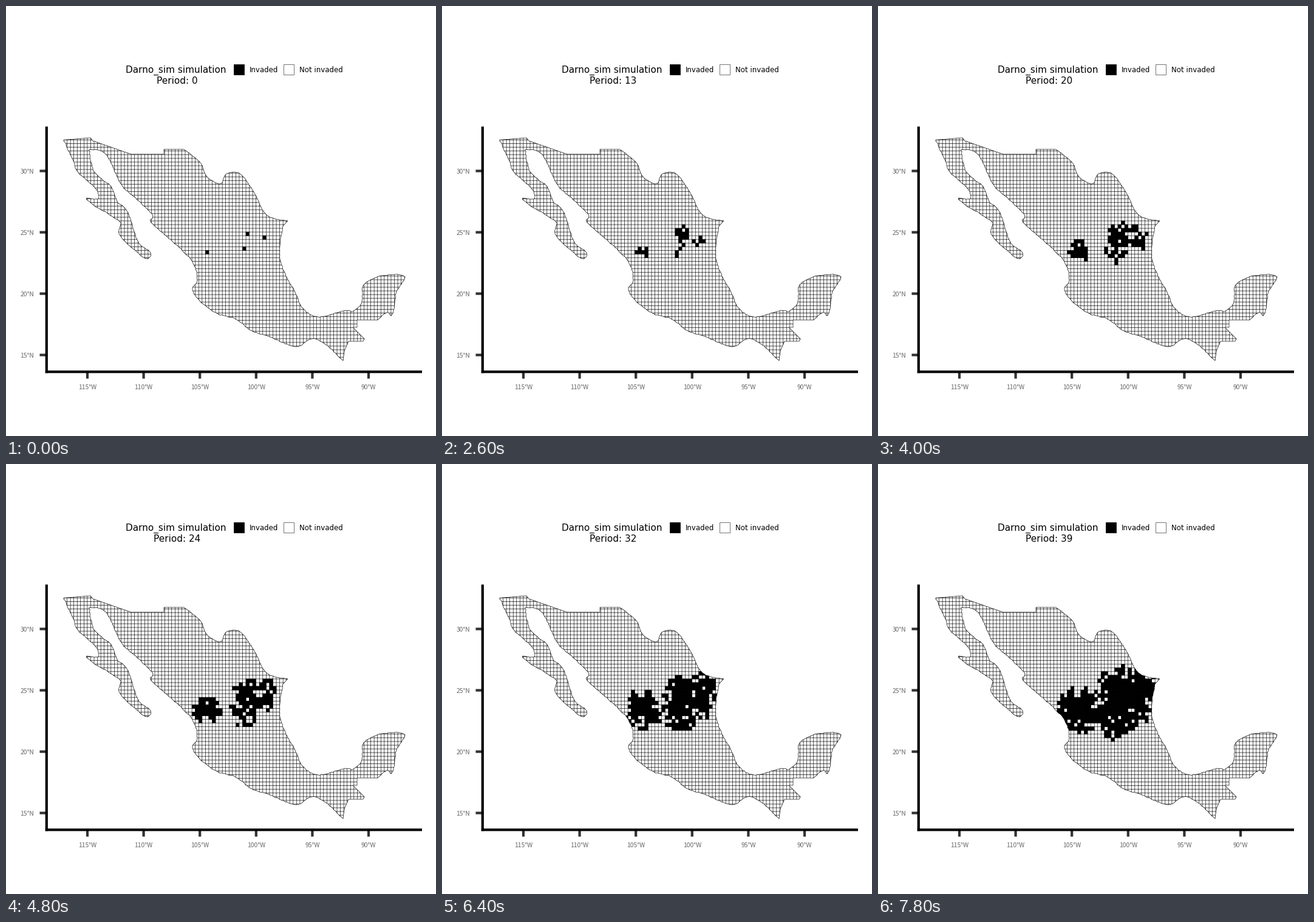
A matplotlib script that plays this animation: 708x708 px, repeating every 8000 ms.

```python
import numpy as np
import matplotlib.pyplot as plt
from matplotlib.animation import FuncAnimation
from matplotlib.collections import LineCollection, PolyCollection
from matplotlib.patches import Polygon, Rectangle

SIZE, DPI = 708, 100
PX = 72 / DPI                      # points per pixel
FRAMES, STEP = 40, 200
X0, Y0 = 95.0, 584.2               # south-west corner of the cell grid
CW, CH = 5.556, 6.06               # cell size
COLS, ROWS = 102, 61
HAIR = 0.65 * PX

# Key points of the outline in pixels, clockwise from the north-west corner
NORTH = [(95, 220.5), (139, 217), (143, 222), (206, 244), (260, 244),
         (260, 236), (293, 236)]
RIVER = [(293, 236), (320, 258), (330, 280), (353, 293), (362, 277),
         (385, 276), (408, 306), (429, 344), (464, 354)]
GULF = [(464, 354), (455, 368), (452, 420), (477, 474), (489, 498),
        (514, 512), (558, 501), (571, 503), (586, 487), (589, 459),
        (619, 444), (656, 445), (643, 470), (640, 490), (635, 510),
        (628, 504), (612, 517)]
SOUTH = [(612, 517), (578, 517), (578, 529), (571, 529), (590, 548),
         (588, 552), (564, 552), (557, 568), (555, 584)]
PACIFIC = [(555, 584), (527, 558), (503, 548), (477, 561), (433, 544),
           (405, 535), (377, 515), (349, 507), (320, 487), (307, 466),
           (315, 450), (305, 418), (264, 379), (238, 355), (242, 345),
           (215, 318), (190, 294), (171, 254), (158, 239), (137, 236)]
PENINSULA = [(137, 236), (145, 273), (173, 297), (183, 322), (200, 339),
             (217, 387), (238, 406), (228, 415), (187, 377), (187, 355),
             (143, 327), (133, 316), (151, 318), (149, 302), (118, 273),
             (110, 253), (95, 220.5)]

# First invaded cells: column, row, periods per column and per row of spread
SEEDS = [(42, 29, 5.4, 5.5), (54, 34, 5.0, 5.4),
         (53, 30, 5.4, 4.0), (59, 33, 5.8, 4.4)]
DELAY = 7.5                        # mean extra wait of a cell, in periods


def coast(points, rng, amp=0.7, gap=3.0):
    """Smooth curve through the points with a little ragged noise."""
    p = np.array([points[0], *points, points[-1]], float)
    out = []
    for a, b, c, d in zip(p, p[1:], p[2:], p[3:]):
        n = max(2, int(np.hypot(*(c - b)) / gap))
        t = np.arange(n)[:, None] / n
        curve = b + 0.5 * t * (c - a + t * (2 * a - 5 * b + 4 * c - d
                                            + t * (3 * (b - c) + d - a)))
        curve[1:] += rng.uniform(-amp, amp, (n - 1, 2))
        out += list(curve)
    return out


def invasion_periods(rng):
    """Period at which each cell is invaded, indexed [row, column]."""
    row, col = np.mgrid[:ROWS, :COLS]
    reach = np.min([np.hypot(sx * (col - c), sy * (row - r))
                    for c, r, sx, sy in SEEDS], axis=0)
    return np.where(reach > 0, reach + rng.exponential(DELAY, reach.shape), 0)


def cell(c, r):
    x, y = X0 + c * CW, Y0 - r * CH
    return [(x, y), (x + CW, y), (x + CW, y - CH), (x, y - CH)]


rng = np.random.default_rng(12)
outline = (NORTH[:-1] + coast(RIVER, rng, 0.4) + coast(GULF, rng)
           + SOUTH[:-1] + coast(PACIFIC, rng) + coast(PENINSULA, rng))
born = invasion_periods(rng)

fig = plt.figure(figsize=(SIZE / DPI, SIZE / DPI), dpi=DPI, facecolor="white")
ax = fig.add_axes([0, 0, 1, 1])
ax.set(xlim=(0, SIZE), ylim=(SIZE, 0))
ax.axis("off")


def line(x, y, color):
    ax.plot(x, y, color=color, lw=4.2 * PX, solid_capstyle="butt", snap=False)


def key(x, fill, edge):
    ax.add_patch(Rectangle((x, 96), 17, 17, fc=fill, ec=edge, lw=0.8 * PX))


def label(x, y, s, size, ha="left", color="black", font="DejaVu Sans"):
    return ax.text(x, y, s, fontsize=size * PX, ha=ha, va="baseline",
                   color=color, fontfamily=font)


def tick_label(x, y, s, ha):
    label(x, y, s, 10.3, ha, "#666666", "Noto Sans CJK JP")


# Map with its cell grid
land = Polygon(outline, closed=True, fc="white", ec="black", lw=HAIR)
ax.add_patch(land)
lines = [[(X0 + i * CW, 200), (X0 + i * CW, 600)] for i in range(COLS)]
lines += [[(90, Y0 - j * CH), (665, Y0 - j * CH)] for j in range(ROWS)]
grid = LineCollection(lines, colors="black", linewidths=HAIR, snap=False)
invaded = PolyCollection([], facecolors="black", edgecolors="black",
                         linewidths=HAIR, snap=False)
for part in (grid, invaded):
    ax.add_collection(part, autolim=False)
    part.set_clip_path(land)

# Axes
for i in range(6):
    x = 134 + 92.6 * i
    line([x, x], [602, 613.5], "#333333")
    tick_label(x, 631, f"{115 - 5 * i}°W", "center")
for i in range(4):
    y = 574.6 - 101 * i
    line([55.5, 67], [y, y], "#333333")
    tick_label(46, y + 4, f"{15 + 5 * i}°N", "right")
line([66.8, 66.8], [198.5, 604.3], "black")
line([64.8, 685], [602.3, 602.3], "black")

# Legend
label(280, 110, "Darno_sim simulation", 15.3, "center")
period = label(282, 128, "", 15.3, "center")
key(375, "black", "black")
key(457, "white", "#555555")
label(401, 109, "Invaded", 11.7)
label(483, 109, "Not invaded", 11.7)


def draw(k):
    period.set_text(f"Period: {k}")
    invaded.set_verts([cell(c, r) for r, c in np.argwhere(born <= k)])
    return period, invaded


anim = FuncAnimation(fig, draw, frames=FRAMES, interval=STEP, repeat=True,
                     repeat_delay=0, blit=False)
plt.show()
```
